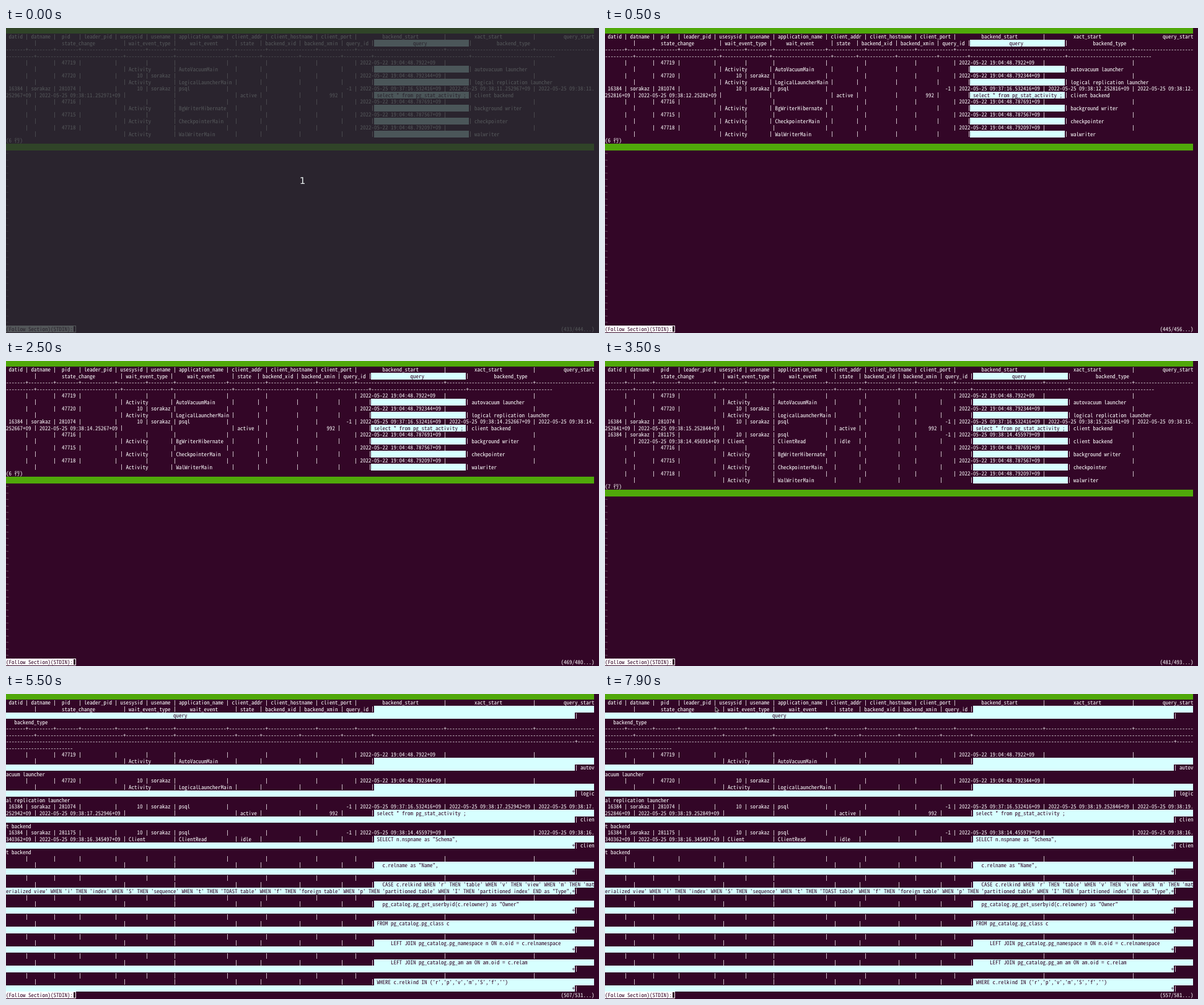
An HTML page with a canvas that plays this animation: 957 by 493 pixels, repeating every 8000 ms.

```html
<!DOCTYPE html>
<html lang="ja">
<head>
<meta charset="utf-8">
<title>pg_stat_activity</title>
<style>
html, body { margin: 0; width: 100%; height: 100%; overflow: hidden; background: #330627; }
canvas { display: block; }
</style>
</head>
<body>
<canvas id="stage" width="957" height="493"></canvas>
<script>
const ctx = document.getElementById('stage').getContext('2d');
const CELL = 4.5, LINE = 10.5, COLS = 211, STATUS_ROW = 46, LOOP = 8000;
const BG = '#330627', FG = '#fff', GREEN = '#50a80a', MARK = '#d7ffff', DIM = '#85707d', RULE = '#cbbcc6';
const MONO = '"Noto Sans Mono CJK JP", "Noto Sans Mono", monospace';
const USER = 'sorakaz';

// One glyph advance equals one terminal cell.
ctx.font = `100px ${MONO}`;
const fontSize = CELL * 100 / ctx.measureText('0').width;

const HEAD = ('datid datname pid leader_pid usesysid usename application_name client_addr ' +
  'client_hostname client_port backend_start xact_start query_start state_change ' +
  'wait_event_type wait_event state backend_xid backend_xmin query_id query backend_type').split(' ');
const NUMERIC = new Set(['datid', 'pid', 'usesysid', 'client_port', 'backend_xmin']);

const LIST_QUERY = `SELECT n.nspname as "Schema",
  c.relname as "Name",
  CASE c.relkind WHEN 'r' THEN 'table' WHEN 'v' THEN 'view' WHEN 'm' THEN 'materialized view' WHEN 'i' THEN 'index' WHEN 'S' THEN 'sequence' WHEN 't' THEN 'TOAST table' WHEN 'f' THEN 'foreign table' WHEN 'p' THEN 'partitioned table' WHEN 'I' THEN 'partitioned index' END as "Type",
  pg_catalog.pg_get_userbyid(c.relowner) as "Owner"
FROM pg_catalog.pg_class c
     LEFT JOIN pg_catalog.pg_namespace n ON n.oid = c.relnamespace
     LEFT JOIN pg_catalog.pg_am am ON am.oid = c.relam
WHERE c.relkind IN ('r','p','v','m','S','f','')
      AND n.nspname <> 'pg_catalog'`;

// Microseconds of query_start and state_change, one pair per second.
const TICKS = ['252967 252971', '252816 25282', '252804 252807', '252667 25267', '252841 252844',
  '252794 252797', '252942 252946', '252731 252735', '252846 252849'];

const today = time => `2022-05-25 09:38:${time}+09`;

const worker = (pid, micros, wait_event, backend_type, more) => ({
  pid, backend_start: `2022-05-22 19:04:48.${micros}+09`,
  wait_event_type: 'Activity', wait_event, backend_type, ...more
});

const client = (pid, more) => ({
  datid: '16384', datname: USER, pid, usesysid: '10', usename: USER, application_name: 'psql',
  client_port: '-1', backend_type: 'client backend', ...more
});

function records(tick) {
  const [queried, changed] = TICKS[tick].split(' ').map(us => today(`${11 + tick}.${us}`));
  const list = [
    worker('47719', '7922', 'AutoVacuumMain', 'autovacuum launcher'),
    worker('47720', '792344', 'LogicalLauncherMain', 'logical replication launcher',
      { usesysid: '10', usename: USER }),
    client('281074', {
      backend_start: '2022-05-25 09:37:16.532416+09', xact_start: queried, query_start: queried,
      state_change: changed, state: 'active', backend_xmin: '992',
      query: 'select * from pg_stat_activity ;'
    })
  ];
  if (tick > 3) {
    const listing = tick > 5;
    list.push(client('281175', {
      backend_start: today('14.455979'),
      query_start: listing ? today('16.340362') : '',
      state_change: today(listing ? '16.345497' : '14.456914'),
      wait_event_type: 'Client', wait_event: 'ClientRead', state: 'idle',
      query: listing ? LIST_QUERY : ''
    }));
  }
  list.push(
    worker('47716', '787691', 'BgWriterHibernate', 'background writer'),
    worker('47715', '787567', 'CheckpointerMain', 'checkpointer'),
    worker('47718', '792097', 'WalWriterMain', 'walwriter'));
  return list;
}

// Lays the records out as psql does; from..to is the span of the query column.
function layout(list) {
  const cells = list.map(rec => HEAD.map(name => (rec[name] || '').split('\n')));
  const widths = HEAD.map((name, i) =>
    Math.max(name.length, ...cells.flatMap(row => row[i].map(s => s.length))));
  const center = (s, w) => (' '.repeat((w - s.length) >> 1) + s).padEnd(w);
  const lines = [
    HEAD.map((name, i) => ` ${center(name, widths[i])} `).join('|'),
    widths.map(w => '-'.repeat(w + 2)).join('+')
  ];
  for (const row of cells) {
    const depth = Math.max(...row.map(c => c.length));
    for (let n = 0; n < depth; n++) {
      lines.push(row.map((cell, i) => {
        const s = cell[n] || '';
        const body = NUMERIC.has(HEAD[i]) ? s.padStart(widths[i]) : s.padEnd(widths[i]);
        return ` ${body}${n + 1 < cell.length ? '+' : ' '}`;
      }).join('|').trimEnd());
    }
  }
  const q = HEAD.indexOf('query');
  const from = widths.slice(0, q).reduce((sum, w) => sum + w + 3, 0);
  return { lines, from, to: from + widths[q] + 2 };
}

function box(col, row, count, color) {
  const left = Math.floor(col * CELL), right = Math.floor((col + count) * CELL);
  const top = Math.floor(row * LINE - 1.5), bottom = Math.floor((row + 1) * LINE - 1.5);
  ctx.fillStyle = color;
  ctx.fillRect(left, top, right - left, bottom - top);
}

function put(ch, col, row, color) {
  if (ch === ' ') return;
  if (ch === '|') {
    ctx.fillStyle = RULE;
    ctx.fillRect(Math.floor(col * CELL + 2), Math.floor(row * LINE - .5), 1, 9);
    return;
  }
  ctx.fillStyle = color;
  ctx.fillText(ch, col * CELL, row * LINE + 6.8);
}

const write = (text, col, row, color = FG) =>
  [...text].forEach((ch, i) => put(ch, col + i, row, color));

// Draws one wrapped line and returns the row below it.
function wrapLine(text, top, from, to) {
  const count = Math.ceil(text.length / COLS);
  for (let n = 0; n < count && top + n < STATUS_ROW; n++) {
    const start = n * COLS, end = start + COLS;
    const a = Math.max(from, start), b = Math.min(to, end);
    if (a < b) box(a - start, top + n, b - a, MARK);
    for (let i = start; i < Math.min(end, text.length); i++) {
      put(text[i], i - start, top + n, i >= from && i < to ? BG : FG);
    }
  }
  return top + count;
}

function drawStatus(tick) {
  const size = k => k < 4 ? 12 : k < 6 ? 13 : 25;
  let first = 433;
  for (let k = 0; k < tick; k++) first += size(k);
  const prompt = '(Follow Section)(STDIN):';
  const place = `(${first}/${first + size(tick) - 1}...)`;
  box(0, STATUS_ROW, prompt.length, FG);
  write(prompt, 0, STATUS_ROW, BG);
  write(place, COLS - place.length, STATUS_ROW);
  ctx.strokeStyle = FG;
  ctx.lineWidth = 1;
  ctx.strokeRect(108.5, 481.5, 4, 10);
}

function drawTerminal(tick) {
  ctx.fillStyle = BG;
  ctx.fillRect(0, 0, 957, 493);
  ctx.font = `${fontSize}px ${MONO}`;
  ctx.textRendering = 'geometricPrecision';
  ctx.textAlign = 'left';
  ctx.textBaseline = 'alphabetic';
  box(0, 0, COLS, GREEN);
  const list = records(tick);
  const { lines, from, to } = layout(list);
  let row = 1;
  lines.forEach((text, i) => {
    row = i === 1 ? wrapLine(text, row, 0, 0) : wrapLine(text, row, from, to);
  });
  if (row < STATUS_ROW) {
    write(`(${list.length} 行 )`, 0, row++); // the wide glyph takes two cells
    box(0, row++, COLS, GREEN);
    while (row < STATUS_ROW) put('~', 0, row++, DIM);
  }
  drawStatus(tick);
}

function drawCountdown() {
  ctx.fillStyle = 'rgba(40, 44, 48, .8)';
  ctx.fillRect(0, 0, 957, 493);
  ctx.fillStyle = '#e8eeee';
  ctx.font = '15px "DejaVu Sans", sans-serif';
  ctx.textAlign = 'center';
  ctx.fillText('1', 478.5, 252);
}

function drawPointer(p) {
  const rest = (1 - p) ** 2;
  ctx.save();
  ctx.translate(178 + 40 * rest, 20.5 + 140 * rest);
  ctx.beginPath();
  [[0, 0], [0, 8.5], [2, 6.8], [3.3, 9.8], [4.7, 9.2], [3.4, 6.3], [6, 6.2]]
    .forEach(([x, y]) => ctx.lineTo(x, y));
  ctx.closePath();
  ctx.fillStyle = '#1c1018';
  ctx.fill();
  ctx.strokeStyle = '#e6dfe3';
  ctx.lineWidth = .8;
  ctx.stroke();
  ctx.restore();
}

let shown = -1;
function frame(now) {
  const step = Math.floor(now % LOOP / 100);
  if (step !== shown) {
    shown = step;
    drawTerminal(Math.floor((step + 5) / 10));
    if (step === 0) drawCountdown();
    if (step >= 73) drawPointer((step - 73) / 6);
  }
  requestAnimationFrame(frame);
}
frame(0);
</script>
</body>
</html>
```
